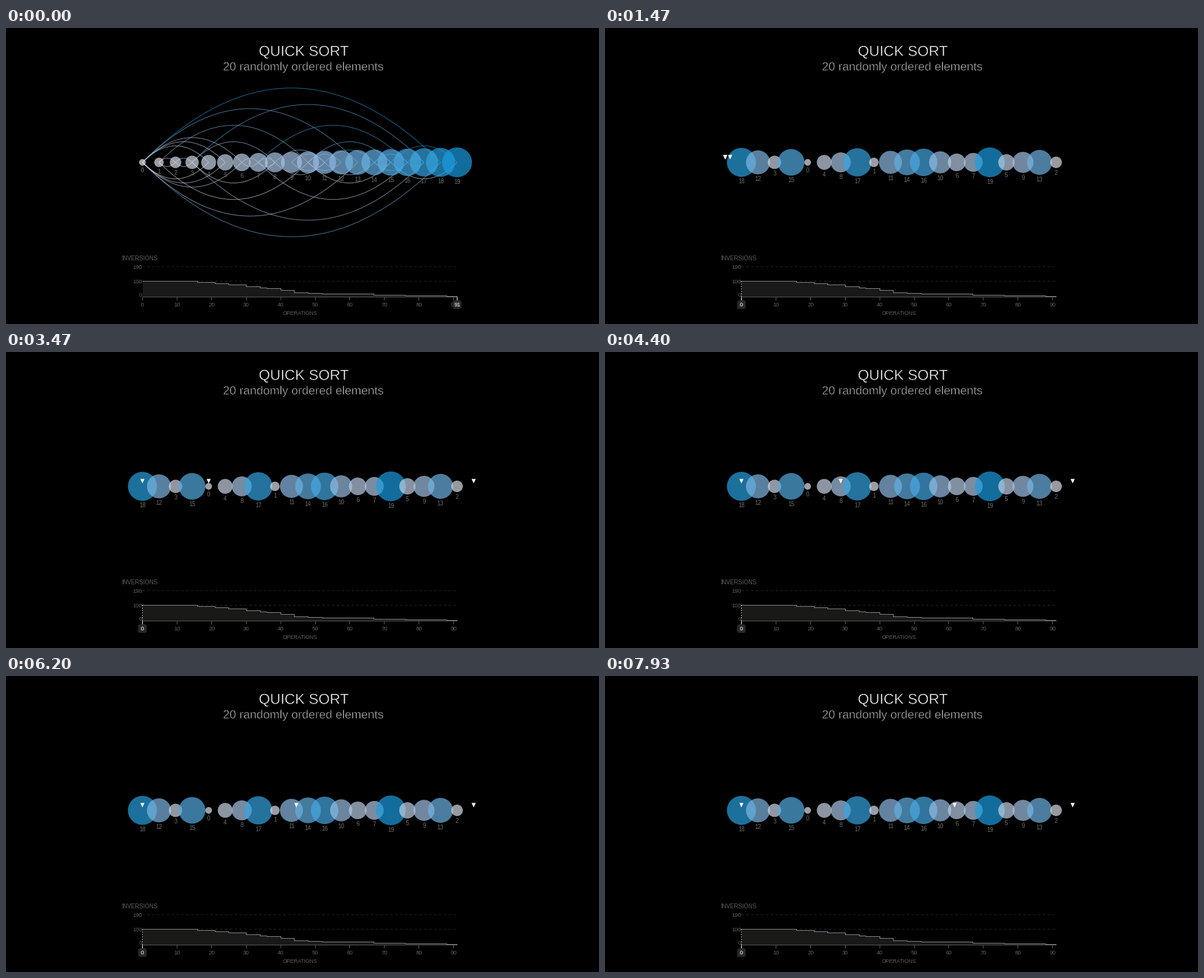
A matplotlib script that plays this animation: 976x488 px, repeating every 8000 ms.

```python
import numpy as np
import matplotlib.pyplot as plt
from matplotlib.animation import FuncAnimation
from matplotlib.patches import Circle, FancyBboxPatch, PathPatch, Polygon
from matplotlib.path import Path
from matplotlib.patheffects import Normal, Stroke

W, H, DPI = 976, 488, 100
LOOP, FRAMES = 8000, 120
PX = 72 / DPI

DATA = [18, 12, 3, 15, 0, 4, 8, 17, 1, 11, 14, 16, 10, 6, 7, 19, 5, 9, 13, 2]
N = len(DATA)
X0, GAP, MID = 224.5, 27.26, 221.5
OPS, BASE = 91, 443.5
RESET, SCAN, STEP = 877, 1387, 511     # ms

plt.rcParams["font.family"] = "Liberation Sans"


def slot(i):
    return X0 + GAP * i


def crisp(p):
    """Centre of the pixel that holds p."""
    return np.floor(p + 1e-6) + 0.5


def op_x(op):
    return X0 + op * (slot(N - 1) - X0) / OPS


def inv_y(count):
    return crisp(BASE - count * 50 / 190)


def radius(v):
    return 24.5 * np.sqrt((v + 1) / N)


def tint(v):
    stops = [(231, 228, 232), (154, 190, 228), (26, 157, 224)]
    return tuple(np.interp(v, [0, 10, 19], ch) / 255 for ch in zip(*stops))


def ease(u):
    u = min(max(u, 0), 1)
    return 4 * u ** 3 if u < 0.5 else 1 - 4 * (1 - u) ** 3


def inversions(a):
    return sum(a[i] > a[j] for i in range(len(a)) for j in range(i + 1, len(a)))


def quick_sort(values):
    """Return the swaps as (i, j, left value, right value) and (op, inversions)."""
    a, swaps, history, ops = list(values), [], [(0, inversions(values))], 0

    def swap(i, j):
        if i != j:
            swaps.append((i, j, a[i], a[j]))
            a[i], a[j] = a[j], a[i]
            history.append((min(ops, OPS), inversions(a)))

    def sort(lo, hi):
        nonlocal ops
        if lo >= hi:
            return
        i, j = lo, hi + 1
        while True:
            i, ops = i + 1, ops + 1
            while i <= hi and a[i] < a[lo]:
                i, ops = i + 1, ops + 1
            j, ops = j - 1, ops + 1
            while a[j] > a[lo]:
                j, ops = j - 1, ops + 1
            if i >= j:
                break
            swap(i, j)
        swap(lo, j)
        sort(lo, j - 1)
        sort(j + 1, hi)

    sort(0, len(a) - 1)
    return swaps, history


SWAPS, HISTORY = quick_sort(DATA)

fig = plt.figure(figsize=(W / DPI, H / DPI), dpi=DPI, facecolor="black")
ax = fig.add_axes([0, 0, 1, 1])
ax.set_xlim(0, W)
ax.set_ylim(H, 0)
ax.axis("off")


def text(x, y, s, size, color, ha="center", z=3):
    return ax.text(x, y, s, fontsize=size * PX, color=color, ha=ha,
                   va="baseline", zorder=z)


def thin_text(x, y, s, size, color):
    """Text in a light weight: a black outline eats into the strokes."""
    label = text(x, y, s, size, color)
    label.set_path_effects([Normal(), Stroke(linewidth=0.65 * PX, foreground="black")])


def line(xs, ys, color, z=2, **kw):
    return ax.plot(xs, ys, color=color, lw=PX, zorder=z, snap=False,
                   solid_capstyle="butt", **kw)[0]


# Headings
thin_text(490, 46, "QUICK SORT", 23.9, "white")
thin_text(490, 70, "20 randomly ordered elements", 19.5, "#c4c4c4")

# Inversions chart
GREY, AXIS = "#62605e", "#5a5856"
text(190, 383, "INVERSIONS", 9.6, GREY, ha="left")
text(483.5, 473, "OPERATIONS", 8.8, GREY)
for value, y in ((190, 397), (100, 421), (0, 443)):
    text(224, y, str(value), 9.4, GREY, ha="right")
for value in (190, 100):
    line([X0, slot(N - 1)], [inv_y(value)] * 2, "#262626", dashes=(4, 4))

step_x = [crisp(op_x(op)) for op, _ in HISTORY] + [crisp(op_x(OPS))]
step_y = [inv_y(n) for _, n in HISTORY] + [BASE]
ax.fill_between(step_x, step_y, BASE, step="post", color="#191918", lw=0, zorder=1)
line([X0, slot(N - 1)], [BASE, BASE], AXIS)
line(step_x, step_y, "#88868a", drawstyle="steps-post")
for op in range(0, OPS, 10):
    line([crisp(op_x(op))] * 2, [444, 449], AXIS)
    text(op_x(op), 459, str(op), 9.5, GREY)

# Current operation
badge = FancyBboxPatch((0, 451), 10, 10, boxstyle="round,pad=2,rounding_size=3",
                       fc="#2b2927", ec="none", zorder=4)
ax.add_patch(badge)
badge_text = text(0, 459, "", 9.5, "white", z=5)
badge_tick = line([0, 0], [BASE, 449], "white", z=5)
badge_dots = line([0, 0], [BASE, BASE], "white", z=5, dashes=(1.5, 2.5))

# Swap arcs
arcs = []
for i, j, left, right in SWAPS:
    a, b = slot(i), slot(j)
    for value, side in ((left, -1), (right, 1)):
        curve = Path([(a, MID), ((a + b) / 2, MID + side * (b - a) / 2), (b, MID)],
                     [Path.MOVETO, Path.CURVE3, Path.CURVE3])
        arcs.append(ax.add_patch(PathPatch(curve, fc="none", ec=tint(value),
                                           lw=PX, alpha=0.65, zorder=5)))

# Elements
balls, labels = [], []
for v in DATA:
    balls.append(ax.add_patch(Circle((0, MID), radius(v), fc=tint(v), ec="none",
                                     alpha=0.7, zorder=6)))
    labels.append(text(0, MID + radius(v) + 11, str(v), 9.7, "#707070", z=7))

markers = [ax.add_patch(Polygon([(0, 0)] * 3, fc="white", ec="none", zorder=8))
           for _ in range(3)]


def marker_slots(t):
    """Slots of the pivot, the scanning pointer and the end pointer."""
    k, u = divmod((t - SCAN) / STEP, 1)
    e = ease(u)
    if k == 0:
        return [-1 + e, -1 + 2 * e, -1 + 21 * e]
    return [0, k + e, 20]


def draw(frame):
    t = frame * LOOP / FRAMES
    back = ease((t - RESET) / (SCAN - RESET))

    for i, v in enumerate(DATA):
        x = slot(v + (i - v) * back)
        balls[i].center = (x, MID)
        labels[i].set_x(x)
    for arc in arcs:
        arc.set_alpha(0.65 * (1 - back))
        arc.set_visible(back < 1)

    op = OPS * (1 - back)
    x = crisp(op_x(op))
    count = [n for at, n in HISTORY if at <= op][-1]
    badge.set_x(x - 5)
    badge_text.set_x(x)
    badge_text.set_text(str(round(op)))
    badge_tick.set_xdata([x, x])
    badge_dots.set_data([x, x], [inv_y(count), BASE])

    scanning = t >= SCAN
    for m, s in zip(markers, marker_slots(t)):
        m.set_visible(scanning)
        x = slot(s)
        m.set_xy([(x - 3.4, 209.3), (x + 3.4, 209.3), (x, 216.7)])
    return []


anim = FuncAnimation(fig, draw, frames=FRAMES, init_func=lambda: draw(0),
                     interval=LOOP / FRAMES, repeat=True, repeat_delay=0, blit=False)
plt.show()
```
